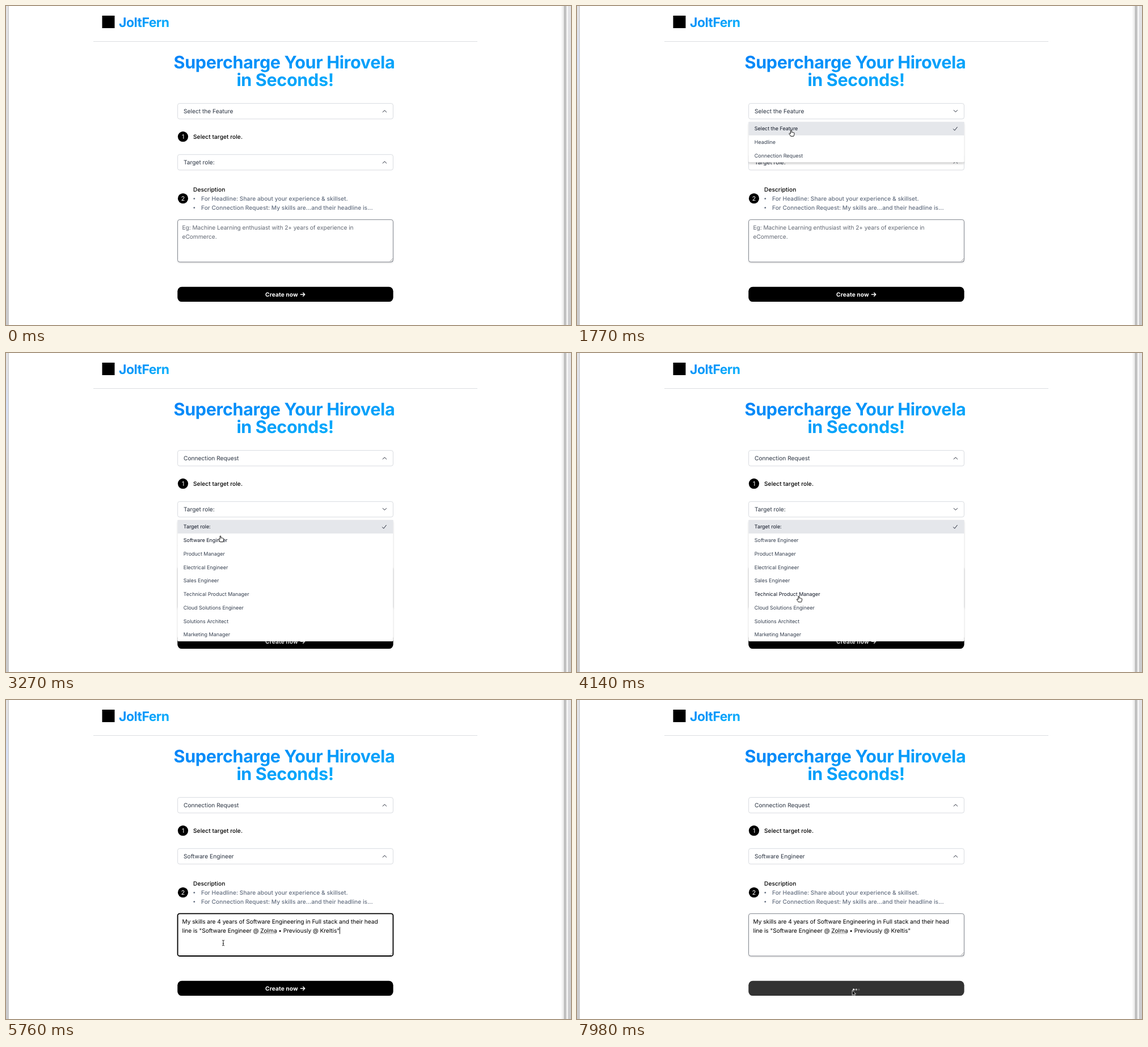
These frames come from a looping animation (996 by 562 pixels, 8 s). An HTML page:

```html
<!DOCTYPE html>
<html lang="en">
<head>
<meta charset="utf-8">
<title>Profile helper</title>
<style>
html, body { margin: 0; width: 100%; height: 100%; overflow: hidden; background: #fff; }
svg { display: block; width: 100%; height: 100%; }
text {
  font: 400 10.2px Inter, "Open Sans", sans-serif;
  font-optical-sizing: none;
  letter-spacing: -.06px;
  text-rendering: geometricPrecision;
  white-space: pre;
}
.brand { font-size: 23px; font-weight: 700; letter-spacing: -.55px; fill: url(#brandFill); }
.title { font-size: 30.6px; font-weight: 700; letter-spacing: -.38px; fill: url(#titleFill); }
.strong { font-weight: 500; letter-spacing: .04px; }
.cta { font-weight: 700; letter-spacing: .1px; fill: #fff; }
.num { font-size: 10.6px; fill: #fff; text-anchor: middle; }
.item { font-size: 9px; letter-spacing: -.04px; fill: #374151; }
.label { letter-spacing: 0; fill: #2b3442; }
.hint { fill: #636974; }
.line { fill: none; stroke: #111827; stroke-width: .95; stroke-linecap: round; stroke-linejoin: round; }
.cursor { stroke-linejoin: round; }
</style>
</head>
<body>
<svg id="stage" viewBox="0 0 996 562" xmlns="http://www.w3.org/2000/svg">
  <defs>
    <linearGradient id="titleFill" gradientUnits="userSpaceOnUse" x1="0" y1="0" x2="1" y2="1" gradientTransform="translate(296 83) scale(393 64)">
      <stop stop-color="#0580f8"/><stop offset="1" stop-color="#06b8fc"/>
    </linearGradient>
    <linearGradient id="brandFill" gradientUnits="userSpaceOnUse" x1="0" y1="0" x2="1" y2="1" gradientTransform="translate(199 16) scale(89 25)">
      <stop stop-color="#0580f8"/><stop offset="1" stop-color="#06b8fc"/>
    </linearGradient>
    <linearGradient id="edge" x2="0" y2="1">
      <stop stop-color="#e2e2e5"/><stop offset="1" stop-color="#cacacc"/>
    </linearGradient>
    <linearGradient id="tintFill" x2="0" y2="1">
      <stop stop-color="#d6e0f6" stop-opacity="0"/><stop offset=".4" stop-color="#d6e0f6"/>
      <stop offset="1" stop-color="#d6e0f6" stop-opacity="0"/>
    </linearGradient>
    <filter id="soft" x="-10%" y="-20%" width="120%" height="150%">
      <feGaussianBlur stdDeviation="1.6"/>
    </filter>
  </defs>

  <rect width="996" height="562" fill="#fff"/>
  <rect width="4" height="562" fill="url(#edge)"/>
  <rect id="tint" y="20" width="4" height="180" fill="url(#tintFill)"/>
  <rect x="4" width="1" height="562" fill="#c4c4c6"/>
  <rect x="980" width="11" height="562" fill="#f8f8f8"/>
  <rect x="980" width="1" height="562" fill="#e6e6e6"/>
  <rect x="983" width="5" height="562" fill="#c2c2c2"/>
  <rect x="990.5" width="5.5" height="562" fill="url(#edge)"/>

  <rect x="169.5" y="17" width="22" height="22"/>
  <text class="brand" x="199" y="36.6">JoltFern</text>
  <rect x="154" y="62" width="677" height="1" fill="#dcdee2"/>
  <text class="title" x="295.5" y="109.5">Supercharge Your Hirovela</text>
  <text class="title" x="492" y="141.2" text-anchor="middle">in Seconds!</text>

  <g id="form"></g>
  <g id="lists"></g>
  <g id="cursors"></g>
</svg>
<script>
const LOOP = 8000;
const $ = id => document.getElementById(id);
const show = (el, on) => el.setAttribute('opacity', +on);
const text = (cls, x, y, str, extra = '') =>
  `<text class="${cls}" x="${x}" y="${y}" ${extra}>${str}</text>`;

// moments of the interaction, in ms
const T = { enter: 30, tint: 690, open1: 1425, pick1: 2220, open2: 2880, pick2: 4500,
            focus: 5160, paste: 5310, spell: 5760, hover: 7090, submit: 7630 };

const features = ['Select the Feature', 'Headline', 'Connection Request'];
const roles = ['Target role:', 'Software Engineer', 'Product Manager', 'Electrical Engineer',
  'Sales Engineer', 'Technical Product Manager', 'Cloud Solutions Engineer',
  'Solutions Architect', 'Marketing Manager'];
const ROW = 23.75;

const step = (n, y) =>
  `<circle cx="312" cy="${y}" r="9.1"/>` + text('num', 312, y + 3.8, n);

const select = (id, y) => `
  <rect x="302.6" y="${y + .5}" width="379.8" height="27.3" rx="3.3" fill="#fff" stroke="#d1d5db" stroke-width=".85"/>
  <rect id="${id}Ring" x="301.7" y="${y - .3}" width="381.6" height="28.8" rx="3.8" fill="none" stroke="#000" stroke-width="1.7"/>
  ${text('label', 313, y + 17.8, '', `id="${id}Label"`)}
  <path id="${id}Chev" class="line"/>`;

const list = (id, y, items) => {
  const h = items.length * ROW;
  const rows = items.map((s, i) => text('item', 312.8, y + i * ROW + 15.2, s)).join('');
  return `<g id="${id}List">
    <rect x="302.5" y="${y + 2}" width="380" height="${h + 1}" rx="3" fill="#000" opacity=".16" filter="url(#soft)"/>
    <rect x="302.2" y="${y}" width="380.6" height="${h}" rx="2" fill="#fff" stroke="#000" stroke-opacity=".07" stroke-width=".7"/>
    <rect x="302.5" y="${y}" width="380" height="${ROW}" fill="#e5e7eb"/>
    <path class="line" d="M663.5 ${y + 12.6}l2.2 2.4 4.6-5.8"/>${rows}</g>`;
};

$('form').innerHTML = select('feature', 171.2) + select('role', 261.2) +
  step(1, 230.2) + text('strong', 330, 234, 'Select target role.') +
  step(2, 339) + text('strong', 330, 327, 'Description') +
  ['For Headline: Share about your experience &amp; skillset.',
   'For Connection Request: My skills are...and their headline is...'].map((s, i) =>
    `<circle cx="331.8" cy="${339.4 + i * 16}" r="1.4" fill="#646f80"/>` +
    text('strong', 344, 342.8 + i * 16, s, 'fill="#646f80"')).join('') + `
  <rect x="302.5" y="378" width="380" height="74.5" rx="4" fill="#000" opacity=".16" filter="url(#soft)"/>
  <rect id="area" x="302.6" y="376.4" width="379.8" height="74.6" rx="3.6" fill="#fff"/>
  <path d="M676.8 450l5-5M679.8 450l2-2" stroke="#777" stroke-width=".7"/>
  <g id="hint">${text('hint', 310.5, 393.9, 'Eg: Machine Learning enthusiast with 2+ years of experience in')}
  ${text('hint', 310.5, 409.9, 'eCommerce.')}</g>
  <g id="typed">${text('', 310.5, 393.9, 'My skills are 4 years of Software Engineering in Full stack and their head')}
  ${text('', 310.5, 409.9, 'line is "Software Engineer @ Zolma • Previously @ Kreltis"', 'id="lastLine"')}</g>
  <path id="spell" d="M448 411.4H477" stroke="#8a8a8a" stroke-width="1" stroke-dasharray="1.6 .8"/>
  <rect id="caret" width=".9" height="12.4"/>
  <rect id="button" x="302.3" y="494.8" width="380.3" height="26.3" rx="7.5"/>
  <g id="cta">${text('cta', 457, 511.8, 'Create now')}
  <path d="M519.3 508.2h7.4m-3-3 3 3-3 3" fill="none" stroke="#fff" stroke-width="1.4" stroke-linecap="round" stroke-linejoin="round"/></g>
  <g id="dots">${[0, 1, 2].map(i => `<circle cx="${487.7 + i * 4.6}" cy="510.2" r="1.65" fill="#fff"/>`).join('')}</g>`;

$('lists').innerHTML = list('feature', 204.2, features) + list('role', 294.2, roles);

$('cursors').innerHTML = `
  <path id="arrow" class="cursor" d="M0 0V8.8L2 6.9 3.3 10 4.9 9.3 3.6 6.3H6.3Z" fill="#000" stroke="#fff" stroke-width=".8"/>
  <path id="hand" class="cursor" d="M-.9.8Q0-.5.9.8V4Q2 3.2 2.7 4.1 3.8 3.5 4.4 4.5 5.7 4.2 5.8 5.6L5.5 8Q5 9.5 4.6 10.8H-.6Q-1.2 9.3-3 7.2-4 5.8-2.8 5.5-1.8 5.4-.9 6.4Z" fill="#fff" stroke="#000" stroke-width=".9"/>
  <path id="beam" class="cursor" d="M-2-4.8Q-.3-4.8 0-3.8 .3-4.8 2-4.8M0-3.8V3.8M-2 4.8Q-.3 4.8 0 3.8 .3 4.8 2 4.8M-1.2 1.2H1.2" fill="none" stroke="#111" stroke-width=".95"/>`;

// pointer path: time, x, y
const path = [
  [30, 718, 560], [300, 560, 302], [600, 560, 302], [1140, 385.5, 187], [1500, 385.5, 187],
  [2100, 366.5, 261], [2370, 366.5, 261], [2520, 370, 271], [2850, 370, 271],
  [3270, 378, 322], [3630, 380, 330], [4050, 392, 443], [4440, 384, 334], [4530, 384, 334],
  [4680, 384, 340], [5130, 383, 428], [6060, 383, 428], [6810, 527, 409.5], [6870, 527, 409.5],
  [7230, 488, 520], [7380, 485.2, 511.5], [8000, 485.2, 511.5]
];
const shapes = [[0, 'arrow'], [1080, 'hand'], [T.pick1, 'arrow'], [2430, 'hand'],
  [T.pick2 + 60, 'beam'], [7000, 'arrow'], [T.hover, 'hand'], [T.submit, 'arrow']];

function pointerAt(t) {
  let i = 0;
  while (i < path.length - 2 && path[i + 1][0] <= t) i++;
  const [t0, x0, y0] = path[i], [t1, x1, y1] = path[i + 1];
  const u = Math.min(1, Math.max(0, (t - t0) / (t1 - t0)));
  const k = u * u * (3 - 2 * u);
  return [x0 + (x1 - x0) * k, y0 + (y1 - y0) * k];
}

function drawSelect(id, y, t, open, pick, blur, before, after) {
  const isOpen = t >= open && t < pick;
  const fade = t < open ? 0 : Math.max(0, Math.min(1, 1 - (t - pick) / 100));
  show($(id + 'List'), fade);
  show($(id + 'Ring'), t >= pick && t < blur);
  $(id + 'Label').textContent = t < pick ? before : after;
  $(id + 'Chev').setAttribute('d', isOpen
    ? `M664.2 ${y + 12.4}l3.2 3.2 3.2-3.2` : `M664.2 ${y + 15.8}l3.2-3.2 3.2 3.2`);
}

function hoverRows(id, top, py) {
  $(id + 'List').querySelectorAll('text').forEach((el, i) => {
    const on = i === 0 || Math.floor((py - top) / ROW) === i;
    el.style.fill = on ? '#111827' : '#374151';
  });
}

function drawArea(t) {
  const focused = t >= T.focus && t < T.submit;
  const pasted = t >= T.paste;
  $('area').setAttribute('stroke', focused ? '#000' : '#747a84');
  $('area').setAttribute('stroke-width', focused ? 1.8 : .9);
  show($('hint'), !pasted);
  show($('typed'), pasted);
  show($('spell'), t >= T.spell);
  show($('caret'), focused && (t + 240) % 1000 < 500);
  $('caret').setAttribute('x', 310.4 + (pasted ? $('lastLine').getComputedTextLength() : 0));
  $('caret').setAttribute('y', pasted ? 399.8 : 383.8);
}

function drawButton(t) {
  const busy = t >= T.submit;
  $('button').setAttribute('fill', t >= T.hover ? '#333' : '#000');
  show($('cta'), !busy);
  show($('dots'), busy);
  [...$('dots').children].forEach((dot, i) => {
    const p = Math.max(0, (t - T.submit - i * 200) / 1400);
    dot.setAttribute('opacity', p < .2 ? .2 + 4 * p : 1.2 - p);
  });
}

function draw(t) {
  const [x, y] = pointerAt(t);
  show($('tint'), t >= T.tint);
  drawSelect('feature', 171.2, t, T.open1, T.pick1, T.open2, features[0], features[2]);
  drawSelect('role', 261.2, t, T.open2, T.pick2, T.focus, roles[0], roles[1]);
  hoverRows('feature', 204.2, y);
  hoverRows('role', 294.2, y);
  drawArea(t);
  drawButton(t);
  const shape = shapes.filter(s => s[0] <= t).pop()[1];
  for (const el of $('cursors').children) {
    show(el, t >= T.enter && el.id === shape);
    el.setAttribute('transform', `translate(${x.toFixed(2)} ${y.toFixed(2)})`);
  }
}

const start = performance.now();
function tick() {
  draw((performance.now() - start) % LOOP);
  requestAnimationFrame(tick);
}
draw(0);
requestAnimationFrame(tick);
</script>
</body>
</html>
```
